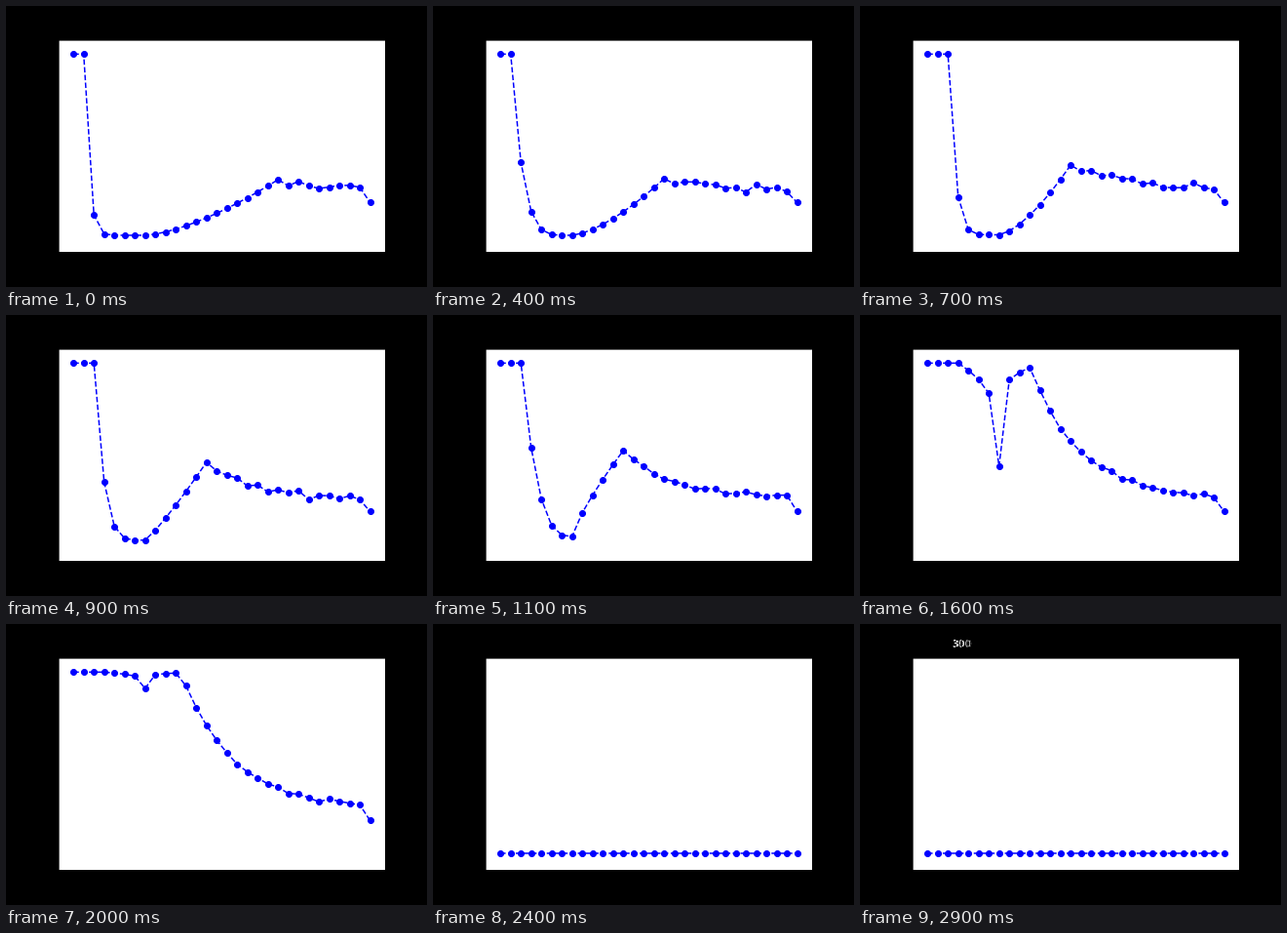
Recreate the animation shown at these times as a matplotlib script. Size 432 by 288 pixels, loop 3000 ms.

```python
import numpy as np
import matplotlib.pyplot as plt
from matplotlib.animation import FuncAnimation
from matplotlib.patches import Rectangle

W, H, DPI = 432, 288, 72
FRAMES, INTERVAL = 30, 100
COUNT = 30
TOP, TAIL, END, FLOOR = 49.3, 189.5, 201.4, 235.4   # heights in pixels
VALLEY = 7          # the dip stays at this point
COLLAPSE = 23       # the whole curve falls to the floor here
COUNTER_FROM = 25   # traces of the counter become visible here

k = np.arange(COUNT)

# how the features of the curve move over the loop
times = [0, 4, 7, 11, 16, 20, 22]
motion = {
    "edge":   [1, 1, 2, 2, 3, 3, 4],                  # end of the plateau
    "depth":  [235, 235, 234.5, 227, 155, 66, 51],    # height of the dip
    "peak":   [20, 16, 14, 12, 10, 10.5, 10.8],       # place of the hump
    "height": [178, 177, 163, 139, 54, 50, 50],       # height of the hump
    "fall":   [12, 5, 7, 3, 0.25, 0.2, 0.2],          # sharpness, left side
    "rise":   [1.5, 1.5, 1.5, 0.8, 0.12, 0.1, 0.1],   # sharpness, right side
}


def ramp(s, n):
    """0 to 1 over s, blunt for a large n and spiky for a small one."""
    return 1 - (1 - np.clip(s, 0, 1)) ** n


def heights(i):
    if i >= COLLAPSE:
        return np.full(COUNT, FLOOR)
    p = {name: np.interp(i, times, path) for name, path in motion.items()}
    edge, depth, peak, height = np.floor(p["edge"]), p["depth"], p["peak"], p["height"]

    left = TOP + (depth - TOP) * ramp((k - edge) / (VALLEY - edge), p["fall"])
    right = height + (depth - height) * ramp((peak - k) / (peak - VALLEY), p["rise"])
    tail = TAIL - (TAIL - height) * np.exp(-np.maximum(k - peak, 0) / 5)
    noise = np.random.default_rng(i).normal(0, 3 - 0.1 * i, COUNT)

    y = np.where(k <= VALLEY, left, np.where(k <= peak, right, tail + noise))
    y[-1] = END
    return y


fig = plt.figure(figsize=(W / DPI, H / DPI), dpi=DPI, facecolor="black")
ax = fig.add_axes([0, 0, 1, 1])
ax.set(xlim=(0, W), ylim=(H, 0))
ax.axis("off")
# soft left and top edges
ax.add_patch(Rectangle((54.6, 35.6), 334.4, 216.4, color="white", lw=0, snap=False))

xs = np.linspace(69.22, 373.58, COUNT)
line, = ax.plot(xs, heights(0), "o--", color="blue", lw=1.5, ms=6)

# black digits over bold white ones leave only broken edges
style = dict(family="DejaVu Sans", size=10, va="baseline", ha="left")
glow = ax.text(94, 24, "", color="white", weight="bold", **style)
ink = ax.text(96, 24, "", color="black", **style)


def update(i):
    line.set_ydata(heights(i))
    label = str(10 * (i + 1)) if i >= COUNTER_FROM else ""
    glow.set_text(label)
    ink.set_text(label)
    return line, glow, ink


anim = FuncAnimation(fig, update, frames=FRAMES, interval=INTERVAL,
                     repeat=True, repeat_delay=0, blit=False)
plt.show()
```
